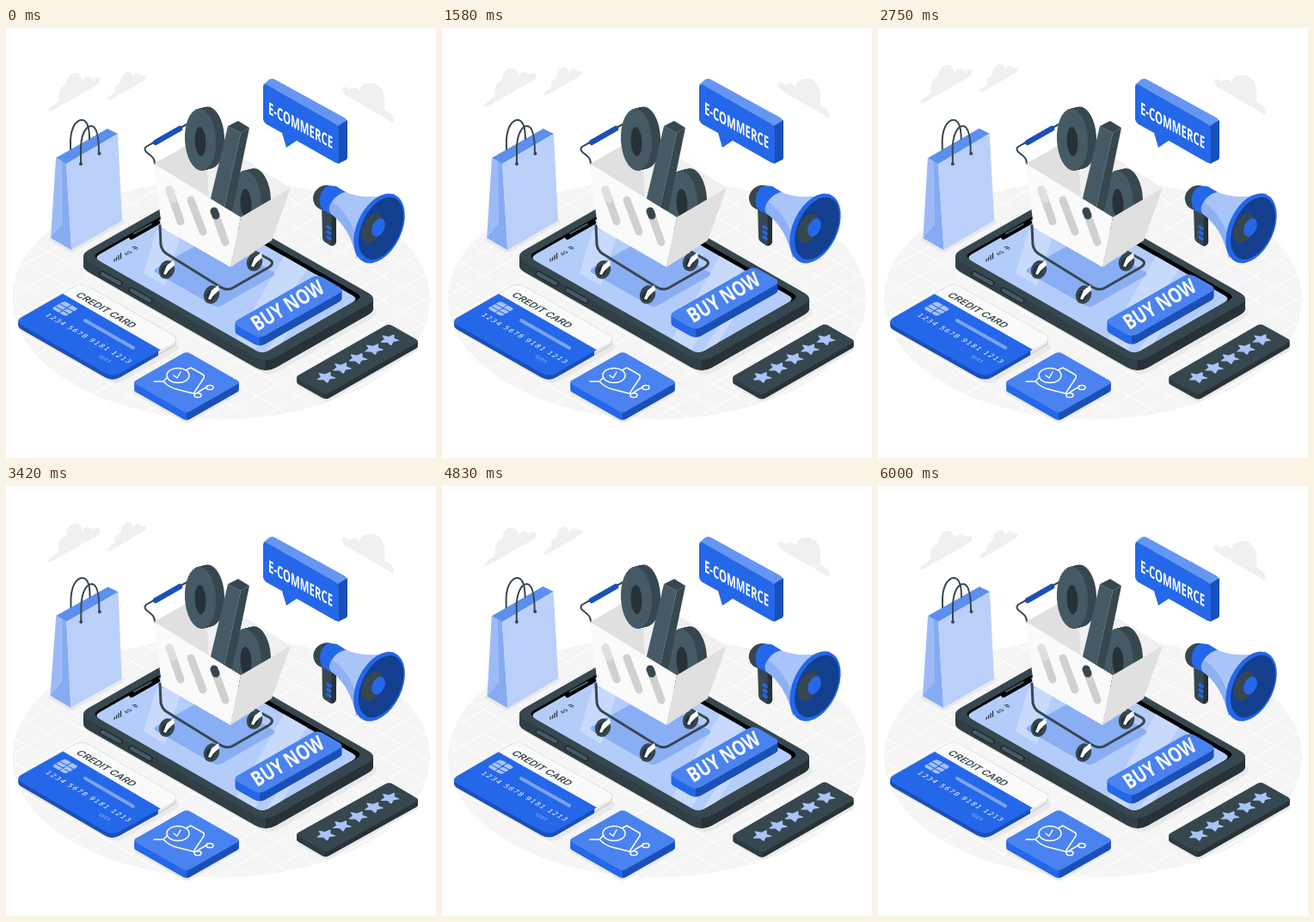
Write an HTML page that moves like this. It is 500 px wide and 500 px high and loops after 6040 ms.

```html
<!DOCTYPE html>
<html lang="en">
<head>
<meta charset="utf-8">
<title>E-commerce scene</title>
<style>
html, body { margin: 0; width: 100%; height: 100%; overflow: hidden; background: #fff; }
svg { display: block; width: 100vw; height: 100vh; }
</style>
</head>
<body>
<svg id="stage" viewBox="0 0 500 500"></svg>
<script>
const BLUE = '#2467e9', MID = '#4a83f0', NAVY = '#1a4fb8', PALE = '#b3ccfa';
const DARK = '#37474f', SLATE = '#455a64', INK = '#263238';
const SLOPE = 0.572;
// text axes lying on the floor: reading down-right and up-right
const DOWN = '.866 .5 -.866 .5', UP = '.866 -.5 .866 .5';

let gradients = 0;

// two flat colours meeting at x,y; dx,dy points towards the second one
function split(x, y, dx, dy, a, b) {
  const id = 'g' + gradients++;
  return [`url(#${id})`, `<linearGradient id="${id}" gradientUnits="userSpaceOnUse"
    x1="${x}" y1="${y}" x2="${x + dx}" y2="${y + dy}">
    <stop stop-color="${a}"/><stop offset="1" stop-color="${b}"/></linearGradient>`];
}

const shape = (d, fill, extra = '') => `<path d="${d}" fill="${fill}" ${extra}/>`;
const line = (d, color, width) =>
  shape(d, 'none', `stroke="${color}" stroke-width="${width}" stroke-linecap="round" stroke-linejoin="round"`);
const oval = (x, y, rx, ry, fill, turn = 0) =>
  `<ellipse cx="${x}" cy="${y}" rx="${rx}" ry="${ry}" fill="${fill}" transform="rotate(${turn} ${x} ${y})"/>`;
const poly = (points, fill) => `<polygon points="${points}" fill="${fill}"/>`;
const label = (s, axes, x, y, size, weight, fill, font, extra = '') =>
  `<text transform="matrix(${axes} ${x} ${y})" font-family="${font}, sans-serif" font-size="${size}" font-weight="${weight}" fill="${fill}" ${extra}>${s}</text>`;

// floor-aligned rectangle with rounded corners, from its left corner
function quad(x, y, u, v, r) {
  const pts = [[x, y], [x + u, y - u * SLOPE],
    [x + u + v, y + (v - u) * SLOPE], [x + v, y + v * SLOPE]];
  const toward = ([ax, ay], [bx, by]) => {
    const k = r / Math.hypot(bx - ax, by - ay);
    return [ax + (bx - ax) * k, ay + (by - ay) * k];
  };
  return pts.map((p, i) => (i ? 'L' : 'M') + toward(p, pts[(i + 3) % 4]) +
    'Q' + p + ' ' + toward(p, pts[(i + 1) % 4])).join('') + 'Z';
}

function slab(x, y, u, v, h, r, top, left, right, edge = x + v) {
  const [side, def] = split(edge - 0.5, 0, 1, 0, left, right);
  let out = def;
  for (let i = h; i > 0; i--) out += shape(quad(x, y + i, u, v, r), side);
  return out + shape(quad(x, y, u, v, r), top);
}

function floor() {
  let grid = '';
  for (let y = -300; y < 800; y += 28) grid += `M0,${y}l500,288M0,${y}l500,-288`;
  return `<clipPath id="round"><ellipse cx="250" cy="315" rx="243" ry="140"/></clipPath>` +
    oval(250, 315, 243, 140, '#f5f5f5') +
    `<g clip-path="url(#round)">${line(grid, '#fff', 1)}</g>` +
    [[88, 281, 131, 218, 14], [14, 350, 78, 114, 10], [147, 424, 63, 63, 5],
     [337, 415, 109, 36, 5], [48, 246, 64, 28, 3]]
      .map(q => shape(quad(...q), '#e9e9e9')).join('');
}

const clouds = () => [
  'M48,97C50,92 58,88 62,84C60,74 64,68 70,66C71,53 80,50 85,53Q89,57 88,62C91,55 99,55 101,60C105,55 111,57 109,63Q108,66 103,68L52,97Z',
  'M118,83C119,79 124,77 127,74C126,68 129,65 133,64C134,53 141,49 145,52Q148,55 147,58C150,51 156,52 157,56Q162,53 163,57Q162,60 157,63L121,84Z',
  'M390,70C392,67 398,69 399,72C403,67 410,69 411,75C411,67 417,64 425,64C434,64 440,73 440,83Q441,91 440,95C446,98 452,102 451,109Q449,111 445,107L400,81Q391,77 390,70Z'
].map(d => shape(d, '#f0f0f0')).join('');

const bag = () =>
  poly('58,151 118,117 130,123 70,158', '#5c8fee') +
  line('M75,141V130C76,113 83,107 88,107C94,107 97,115 97,129', DARK, 2) +
  poly('58,151 70,158 76,258 52,244', '#9cbbf6') +
  poly('65,155 70,158 76,258 66,228', '#86abf2') +
  poly('66,228 76,258 52,244', '#86abf2') +
  poly('70,158 130,123 135,224 76,258', '#bad0f9') +
  line('M87,158V138C88,121 94,114 99,114C105,114 108,123 108,146', DARK, 2) +
  oval(87, 158, 2, 2, DARK) + oval(108.5, 146, 2, 2, DARK);

const phone = () =>
  slab(84, 265, 131, 218, 12, 14, DARK, '#303e46', INK) +
  line('M112,286L132,297M146,305L167,317', '#1d272c', 7) +
  line('M112,286L132,297M146,305L167,317', SLATE, 4.5) +
  shape(quad(100, 265, 116, 199, 8), '#000') +
  `<clipPath id="screen"><path d="${quad(102, 267, 112, 196, 8)}"/></clipPath>
  <g clip-path="url(#screen)">` +
  shape('M90,180H430V390H90Z', PALE) +
  poly('175,235 205,235 185,300 160,285', '#c8dafc') +
  poly('325,262 352,277 290,374 268,361', '#c8dafc') +
  poly('362,284 371,289 314,376 303,376', '#c8dafc') + '</g>' +
  line('M146,243L176,226', '#000', 6) + line('M149,239L169,228', SLATE, 2) +
  line('M126,271v-2M128.5,270v-3M131,269v-4.5M133.5,268v-6', INK, 1.3) +
  label('4G', UP, 140, 265, 6, 500, INK, 'Inter') +
  line('M147,255q3,-2 6,1M149,256.5q2,-1 3,1', INK, 1) +
  shape(quad(170, 282, 69, 76, 6), '#8aaef4');

const button = () =>
  slab(263, 343, 99, 32, 10, 8, MID, BLUE, NAVY) +
  label('BUY NOW', '.866 -.5 .72 1.08', 292, 353, 19, 700, '#fff', 'Open Sans');

const wheel = (x, y) =>
  oval(x, y, 9, 11, DARK, 20) + oval(x - 1, y + 1, 5, 7, INK, 20) +
  shape(`M${x - 4},${y + 5}L${x},${y - 5}L${x + 8},${y - 11}L${x + 9},${y - 5}Q${x + 1},${y + 1} ${x - 1},${y + 6}Z`, '#fff');

function zero(x, y, depth) {
  let out = '';
  for (let i = depth; i > 0; i--) out += oval(x + i, y - i / 4, 18, 36, DARK, -3);
  return out + oval(x, y, 18, 36, SLATE, -3) + oval(x, y + 2, 6.5, 17, INK, -3);
}

const cart = () =>
  line('M179,230L180,252Q181,258 186,262L249,301Q257,306 264,302L306,278Q313,273 306,269L284,257', DARK, 3) +
  wheel(187, 281) + wheel(239, 310) + wheel(289, 272) +
  line('M212,111L172,133L163,138Q160,141 163,144L169,149Q173,152 173,159', DARK, 2) +
  line('M174,133L202,117', NAVY, 6.5) +
  poly('172,158 232,124 236,197', '#e0e0e0') +
  poly('232,124 331,186 273,220 236,197', '#f0f0f0') +
  zero(226, 130, 10) +
  zero(279, 202, 11) +
  poly('258,114 273,122 253,212 237,202', SLATE) +
  poly('273,122 283,116 263,213 253,212', DARK) +
  poly('258,114 270,108 283,116 273,122', DARK) +
  poly('172,158 273,220 261,278 181,232', '#fafafa') +
  poly('273,220 331,186 309,247 261,278', '#e0e0e0') +
  line('M190,188L203,225M215,200L229,237M242,213L255,249', '#d0d0d0', 9) +
  line('M190,188L194,199', '#e0e0e0', 9) +
  line('M242,213L244,218', DARK, 9);

const bubble = () =>
  shape('M299,66L306,60Q309,58 313,60L393,104Q397,107 397,111L387,120Z', '#6496f2') +
  shape('M384,115L397,107V150Q397,153 394,154L386,158Z', NAVY) +
  shape('M303,66L382,111Q387,114 387,119V154Q387,159 382,156L338,131L326,139L321,122L303,112Q299,109 299,105V69Q299,64 303,66Z', BLUE) +
  label('E-COMMERCE', '.59 .325 0 1', 305, 99.5, 19.3, 700, '#fff', 'Open Sans');

const megaphone = () =>
  shape('M367,204L384,212V249Q382,254 377,253L371,249Q368,247 368,243Z', DARK) +
  shape('M379,212L384,215V249Q382,254 378,253Z', INK) +
  line('M374,231l3,2M374,237l3,2M374,243l3,2', BLUE, 3.5) +
  shape('M376,183C366,181 357,189 357,198Q358,210 370,212L384,202Z', DARK) +
  shape('M375,183L384,184L397,192L381,218L369,212C361,204 365,187 375,183Z', BLUE) +
  shape('M395,191Q420,201 452,192L408,268Q400,232 378,216C372,208 383,192 395,191Z', '#a9c4f8') +
  shape('M378,216C374,211 376,206 379,202Q400,216 410,250L408,268Q400,232 378,216Z', '#8eb1f3') +
  oval(434, 233, 26, 43, BLUE, 25) +
  oval(436, 233, 22.5, 38.5, '#133f8e', 25) +
  oval(426, 233, 11, 18, DARK, 25) +
  oval(433, 232, 7, 11, BLUE, 25);

function card() {
  const [face, def] = split(65, 309, 0.5, -0.87, BLUE, '#fafafa');
  return def + line(quad(10, 341, 78, 114, 10), '#d6d6d6', 1.2) +
    slab(10, 341, 78, 114, 5, 10, face, NAVY, '#d6d6d6', 177) +
    line('M178,377L196,366', '#fff', 1) +
    label('CREDIT CARD', DOWN, 80, 311, 11.4, 600, DARK, 'Inter') +
    shape(quad(53, 326, 15, 16, 3), '#a9c4f8') +
    line('M58,324L74,333M63,321L79,330M62,331L76,322', BLUE, 1) +
    line('M92,340L148,372', '#7ba4f3', 4) +
    label('1234 5678 9181 1213', DOWN, 45, 334, 8, 400, '#fff', 'DejaVu Sans', 'letter-spacing="1.3"') +
    label('12/23', DOWN, 107, 382, 5.5, 400, PALE, 'Inter');
}

const tile = () =>
  slab(147, 412, 63, 63, 9, 5, MID, BLUE, NAVY) +
  line('M172,411L183,411Q190,418 198,420L218,425Q221,426 224,423L234,417M183,411L188,406', '#fff', 1.5) +
  line('M209,398L215,395L229,403Q231,404 230,407L218,425', '#fff', 1.5) +
  `<g fill="none" stroke="#fff" stroke-width="1.5"><ellipse cx="200" cy="404" rx="13" ry="8.5"/>
  <ellipse cx="223" cy="427" rx="4" ry="2.5"/><ellipse cx="237" cy="418" rx="4" ry="2.5"/></g>` +
  line('M195,404L199,407L203,400', '#fff', 1.5);

function rating() {
  const star = Array.from({ length: 10 }, (_, i) => {
    const r = i % 2 ? 4.2 : 8.6, a = i * Math.PI / 5;
    return [r * Math.sin(a), -r * Math.cos(a)];
  }).join(' ');
  let out = slab(336, 406, 109, 36, 6, 5, DARK, '#2c3a41', INK);
  for (let i = 0; i < 5; i++)
    out += `<polygon points="${star}" transform="matrix(${UP} ${372 + i * 18.5} ${406 - i * 10.9})"
      fill="#a9c4f8" stroke="#a9c4f8" stroke-width="1.5" stroke-linejoin="round"/>`;
  return out;
}

const group = (kind, body) => `<g class="${kind}">${body}</g>`;
const stage = document.getElementById('stage');
stage.innerHTML = floor() + group('drift', clouds()) + group('sway', bag()) +
  phone() + cart() + group('hover', button()) + bubble() + group('sway', megaphone()) +
  group('sway', card()) + tile() + group('sway', rating());

const pick = kind => [...stage.getElementsByClassName(kind)];
const [drift] = pick('drift'), [hover] = pick('hover');
const swaying = pick('sway').map(el => {
  const b = el.getBBox();
  return [el, b.x + b.width / 2, b.y + b.height / 2];
});

const lift = (t, period) => 10 * (Math.abs(2 * (t / period % 1) - 1) - 1);

function draw(now) {
  const t = now % 6040, p = t / 3000 % 1;
  const angle = p < 0.25 ? 4 * p : p < 0.75 ? 2 - 4 * p : 4 * p - 4;
  drift.setAttribute('transform', `translate(0 ${lift(t, 6000)})`);
  hover.setAttribute('transform', `translate(0 ${lift(t, 3000)})`);
  for (const [el, x, y] of swaying) el.setAttribute('transform', `rotate(${angle} ${x} ${y})`);
}

const start = performance.now();
function tick() {
  draw(performance.now() - start);
  requestAnimationFrame(tick);
}
tick();
</script>
</body>
</html>
```
